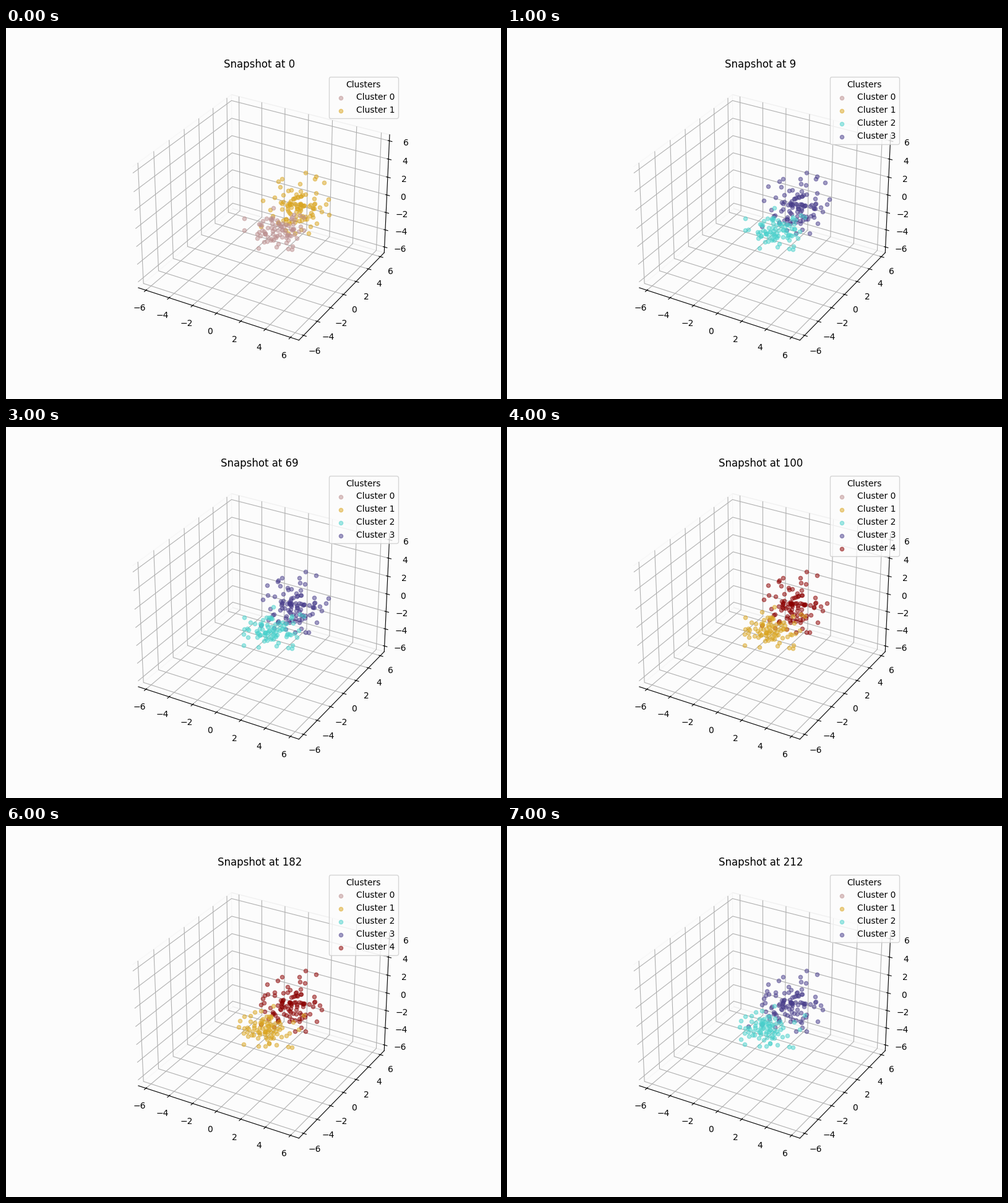
Recreate the animation shown at these times as a matplotlib script. Size 800 by 600 pixels, loop 8 s.

```python
import numpy as np
import matplotlib.pyplot as plt
from matplotlib.animation import FuncAnimation

PAPER = "#fcfcfc"
plt.rcParams.update({"figure.facecolor": PAPER, "axes.facecolor": PAPER})

COLORS = ["rosybrown", "goldenrod", "mediumturquoise", "darkslateblue", "darkred"]
SNAPSHOTS = [0, 9, 39, 69, 100, 130, 182, 212]
LIMIT = 6.4 * 25 / 24
STEP = 8      # points replaced in each cloud per snapshot
DRIFT = -0.38  # sideways shift in pixels from one new point to the next


class Cloud:
    """A sliding window over a drifting stream of points, in stage pixels."""

    def __init__(self, seed, size, center, spread, anchors):
        rng = np.random.default_rng(seed)
        n = size + STEP * (len(SNAPSHOTS) - 1)
        offset = np.clip(rng.normal(size=(n, 2)), -2.1, 2.1) * spread
        self.stream = offset + center
        self.stream[:, 0] += DRIFT * np.arange(n)
        self.size = size
        self.anchors = anchors

    def at(self, step):
        start = step * STEP
        return np.vstack([self.stream[start:start + self.size], self.anchors])


upper = Cloud(4, 98, (489, 288), (20, 21),
              [(484, 234), (501, 240), (510, 297), (498, 276), (502, 316), (477, 326)])
lower = Cloud(11, 80, (452, 328), (20, 14),
              [(462, 358), (432, 291), (481, 306)])

fig = plt.figure(figsize=(8, 6), dpi=100)
ax = fig.add_subplot(projection="3d")
ax.set(xlim=(-LIMIT, LIMIT), ylim=(-LIMIT, LIMIT), zlim=(-LIMIT, LIMIT))
for axis in (ax.xaxis, ax.yaxis, ax.zaxis):
    axis.set_ticks(range(-6, 7, 2))
    axis.pane.fill = False

stage = fig.add_axes([0, 0, 1, 1])
stage.set(xlim=(0, 800), ylim=(600, 0))
stage.axis("off")


def dots(color):
    return stage.scatter([], [], s=20, color=color, alpha=0.5)


upper_dots = dots(COLORS[1])
lower_dots = dots(COLORS[0])
keys = [dots(c) for c in COLORS]


def clusters(step):
    """Labels of the lower and upper cloud."""
    if step == 0:
        return 0, 1
    return (2, 3) if step % 2 else (1, 4)


def draw(step):
    low, high = clusters(step)
    for marks, cloud, label in ((lower_dots, lower, low), (upper_dots, upper, high)):
        marks.set_offsets(cloud.at(step))
        marks.set_color(COLORS[label])
    ax.set_title(f"Snapshot at {SNAPSHOTS[step]}")
    labels = [f"Cluster {i}" for i in range(high + 1)]
    ax.legend(keys[:high + 1], labels, title="Clusters", loc="upper right")
    return []


anim = FuncAnimation(fig, draw, frames=len(SNAPSHOTS), interval=1000, repeat=True)
plt.show()
```
